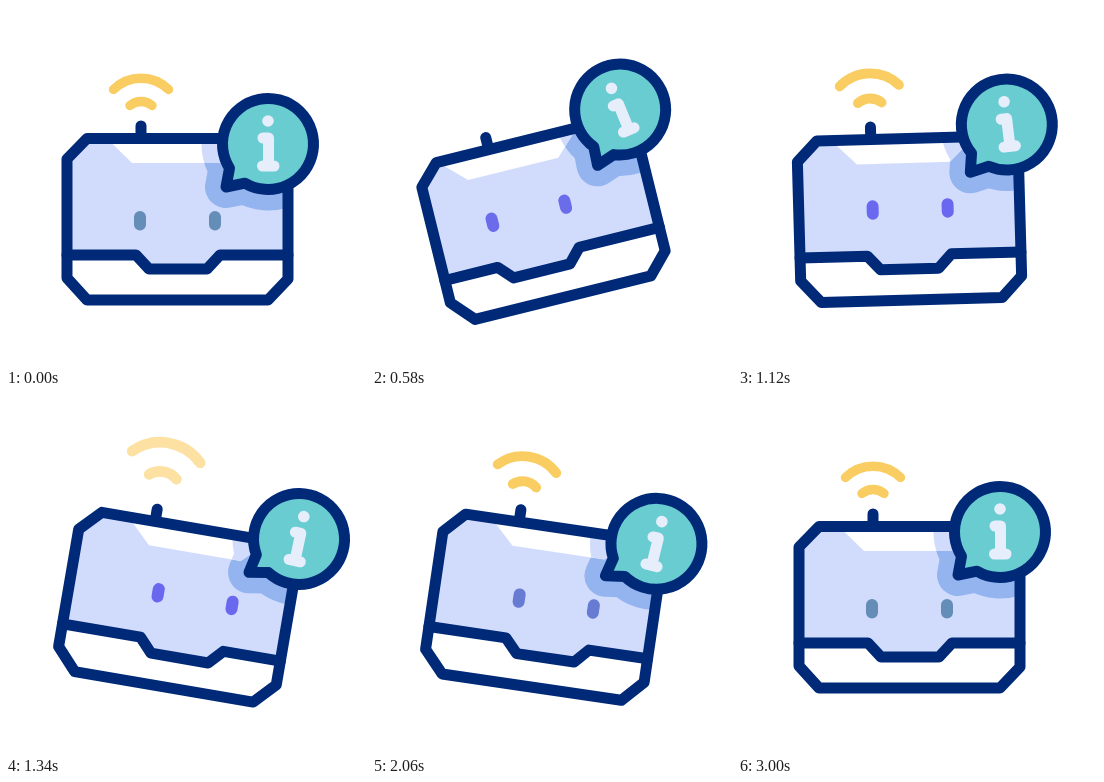
An HTML page for the animation above (3.02 s loop, 360 by 360 pixels).

```html
<!DOCTYPE html>
<html lang="en">
<head>
<meta charset="utf-8">
<title>Info robot</title>
<style>
  html, body { margin: 0; width: 100%; height: 100%; overflow: hidden; background: #fff; }
  svg { display: block; width: 100vw; height: 100vh; }
  .line { fill: none; stroke: #002a78; stroke-width: 11; stroke-linecap: round; stroke-linejoin: round; }
  .glow { stroke-width: 42; stroke-linejoin: round; }
  .dark { fill: #94b4f0; stroke: #94b4f0; }
  .pale { fill: #d1dcfd; stroke: #d1dcfd; }
  #waves { fill: none; stroke: #facd62; stroke-width: 9.5; stroke-linecap: round; }
  #mark { fill: none; stroke: #e6eefc; stroke-width: 11; stroke-linecap: round; stroke-linejoin: round; }
</style>
</head>
<body>
<svg viewBox="0 0 360 360">
  <defs>
    <path id="shell" d="M81 132.5H262L282 153V273L262 294H81L61 272V153Z"/>
    <path id="balloon" d="M-38.5 24.2L-42 43L-23 39.2A45.5 45.5 0 1 0 -38.5 24.2Z"/>
    <path id="shine" d="M101 132.5L126 157H219L244 132.5Z"/>
    <clipPath id="inShell"><use href="#shell"/></clipPath>
    <clipPath id="inShine"><use href="#shine"/></clipPath>
  </defs>

  <g id="robot">
    <g id="waves">
      <path d="M107.5 83.5A39 39 0 0 1 162.5 83.5"/>
      <path d="M124 99.5A17 17 0 0 1 146 99.5"/>
    </g>
    <path class="line" d="M135 120V132"/>
    <use href="#shell" fill="#d1dcfd"/>
    <g clip-path="url(#inShell)">
      <g class="shade"><use href="#balloon" class="glow dark"/></g>
      <use href="#shine" id="gloss" fill="#fff"/>
      <g clip-path="url(#inShine)">
        <g class="shade"><use href="#balloon" class="glow pale"/></g>
      </g>
      <path id="jaw" fill="#fff"/>
    </g>
    <g id="eyes">
      <rect x="128" y="205" width="12" height="19.5" rx="6"/>
      <rect x="203" y="205" width="12" height="19.5" rx="6"/>
    </g>
    <path id="mouth" class="line"/>
    <use href="#shell" class="line"/>
  </g>

  <g id="bubble">
    <use href="#balloon" class="line" style="fill:#68ccd1"/>
    <circle cy="-23" r="5.8" fill="#e6eefc"/>
    <path id="mark" d="M-5 -6H.5V22M-5.5 22H6"/>
  </g>
</svg>

<script>
const LOOP = 3020;
const CENTER = [171.5, 213];
const times = [0, 320, 600, 800, 900, 1340, 1820, 2300, 2460];
const tracks = {
  turn:  [0, -7.3, -14, -14.3, -13.2, 9.7, 14.4, 1.1, 0],
  tilt:  [0, -17, -22.5, -24.5, -23.5, 12, 25.2, 1, 0],
  x:     [262, 252, 248, 246.5, 247, 293, 302.5, 264, 262],
  y:     [138, 113, 103, 96.5, 97, 145, 163, 137, 138],
  shine: [0, -15, -18.5, -19, -18, 7, 12, 0, 0],
  eyeX:  [0, -7, -13, -13.5, -13, 16, 22, 1, 0],
  eyeY:  [0, -6, -11, -11.5, -11, -12.5, -12.5, -0.7, 0],
  tint:  [0, 0.3, 0.9, 1, 1, 1, 1, 0, 0]
};
const $ = id => document.getElementById(id);
const shades = document.querySelectorAll('.shade');
const clamp = v => Math.min(1, Math.max(0, v));
const smooth = (a, b, t) => { const s = clamp((t - a) / (b - a)); return s * s * (3 - 2 * s); };
const place = (el, value) => el.setAttribute('transform', value);

// Monotone cubic through the keys, at rest at both ends
function sample(values, t) {
  const last = times.length - 1;
  if (t >= times[last]) return values[last];
  const chord = k => (values[k + 1] - values[k]) / (times[k + 1] - times[k]);
  const slope = k => {
    if (k === 0 || k === last) return 0;
    const a = chord(k - 1), b = chord(k);
    return a * b > 0 ? 2 * a * b / (a + b) : 0;
  };
  let i = 0;
  while (t >= times[i + 1]) i++;
  const h = times[i + 1] - times[i], s = (t - times[i]) / h;
  const ease = s * s * (3 - 2 * s);
  return values[i] + (values[i + 1] - values[i]) * ease
    + h * s * (1 - s) * ((1 - s) * slope(i) - s * slope(i + 1));
}

// The signal grows and fades three times, then fades back in
function signal(t) {
  if (t >= 2460) return { scale: 1, alpha: smooth(2720, 3000, t) };
  const start = t < 760 ? 0 : t < 1700 ? 940 : 1880;
  const s = (t - start) / 580;
  const shown = start ? smooth(start - 40, start + 130, t) : 1;
  return { scale: 1 + 0.33 * smooth(0, 1, s), alpha: shown * (1 - clamp((s - 0.55) / 0.34)) };
}

function draw(t) {
  const p = {};
  for (const name in tracks) p[name] = sample(tracks[name], t);
  const pivot = CENTER.join(' ');
  const bubble = `translate(${p.x} ${p.y}) rotate(${p.tilt})`;

  place($('robot'), `rotate(${p.turn} ${pivot})`);
  place($('bubble'), bubble);
  shades.forEach(el => place(el, `rotate(${-p.turn} ${pivot}) ${bubble}`));
  place($('shine'), `translate(${p.shine} 0)`);
  place($('eyes'), `translate(${p.eyeX} ${p.eyeY})`);

  const mix = (a, b) => Math.round(a + (b - a) * p.tint);
  $('eyes').setAttribute('fill', `rgb(${mix(100, 107)},${mix(141, 104)},${mix(183, 240)})`);

  const n = p.turn * 1.05;
  const lip = `M61 249H${130 + n}L${143 + n} 263H${201 + n}L${214 + n} 249H282`;
  $('mouth').setAttribute('d', lip);
  $('jaw').setAttribute('d', lip + 'V300H61Z');

  const { scale, alpha } = signal(t);
  place($('waves'), `translate(135 148) scale(${scale}) translate(-135 -148)`);
  $('waves').setAttribute('stroke-width', 9.5);
  $('waves').style.strokeWidth = 9.5 / Math.sqrt(scale);
  $('waves').setAttribute('opacity', alpha);
}

function frame() {
  draw(performance.now() % LOOP);
  requestAnimationFrame(frame);
}
frame();
</script>
</body>
</html>
```
